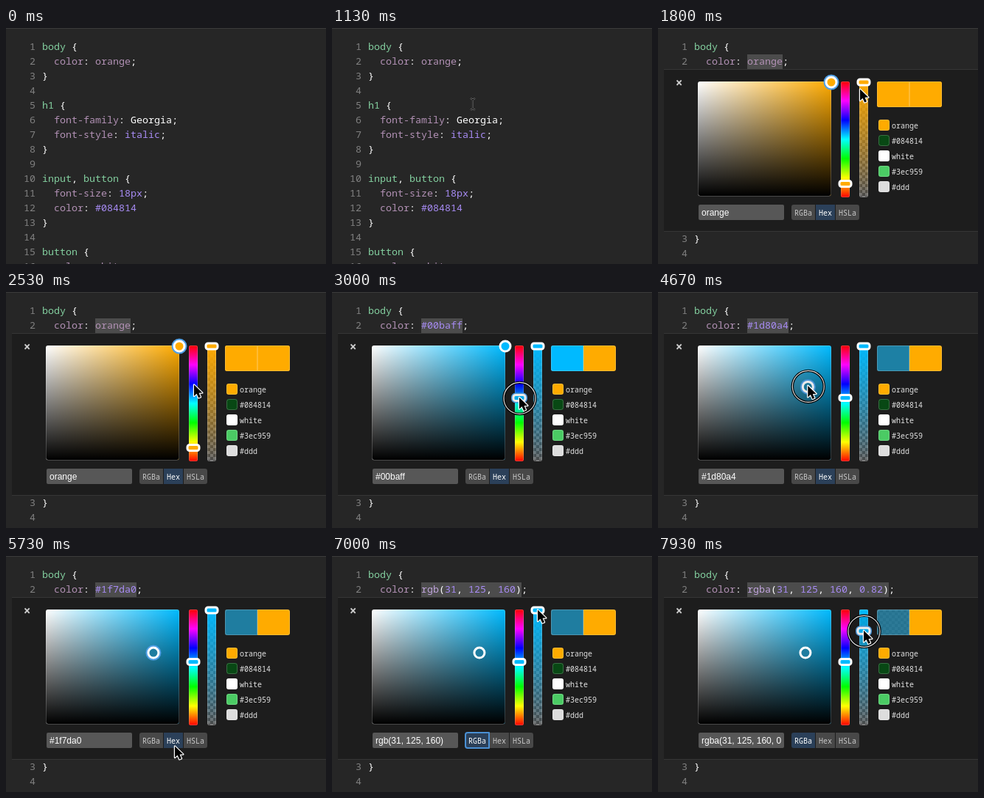
Animation, 434 px wide and 322 px high, one loop 8000 ms. Source, as an HTML page with a canvas:

```html
<!DOCTYPE html>
<html lang="en">
<head>
<meta charset="utf-8">
<title>Inline color picker</title>
<style>
  html, body { margin: 0; width: 100%; height: 100%; overflow: hidden; background: #262626; }
  canvas { display: block; width: 434px; height: 322px; }
</style>
</head>
<body>
<canvas width="434" height="322"></canvas>
<script>
const ctx = document.querySelector('canvas').getContext('2d');
const LOOP = 8000, STEP = 1000 / 15;
const MONO = '"Noto Sans Mono", monospace';
const ORANGE = '#ffab00';
const GREEN = '#83cf9f', MAUVE = '#b291b5', VIOLET = '#a78bf3', LIGHT = '#fff';

// Moments of the interaction
const OPEN = 1500, HUE_DOWN = 2640, HUE_UP = 3030, SQUARE_DOWN = 3400, SQUARE_UP = 4960,
      RGB_DOWN = 6250, RGB_UP = 6450, ALPHA_DOWN = 7150;
const PRESSES = [[1340, 1530], [HUE_DOWN, HUE_UP], [SQUARE_DOWN, SQUARE_UP], [RGB_DOWN, RGB_UP], [ALPHA_DOWN, LOOP]];

// Pointer path: time, x, y
const PATH = [
  [70, 442, 315], [870, 268, 201], [1320, 145, 46], [1530, 145, 46], [1800, 274, 84],
  [2530, 255, 127], [2640, 254, 132], [3000, 254, 144.44], [3060, 254, 144.44],
  [3340, 235, 73], [3400, 235, 73], [3666, 225.1, 106.03], [4300, 210, 123],
  [4900, 199.93, 131.1], [5000, 199.93, 131.1], [5700, 229, 260], [5870, 229, 260],
  [6200, 197, 252], [6520, 197, 252], [6990, 279, 74], [7150, 279, 74], [7930, 279, 102.3]
];

const clamp = (v, lo, hi) => Math.min(hi, Math.max(lo, v));
const ease = p => p * p * (3 - 2 * p);

function pointer(t) {
  const i = PATH.findIndex(key => key[0] > t);
  if (i === 0) return PATH[0].slice(1);
  if (i < 0) return PATH[PATH.length - 1].slice(1);
  const [a, b] = [PATH[i - 1], PATH[i]];
  const p = ease((t - a[0]) / (b[0] - a[0]));
  return [a[1] + (b[1] - a[1]) * p, a[2] + (b[2] - a[2]) * p];
}

function hsvToRgb(h, s, v) {
  return [5, 3, 1].map(n => {
    const k = (n + h / 60) % 6;
    return Math.round(255 * (v - v * s * clamp(Math.min(k, 4 - k), 0, 1)));
  });
}

function pickerState(t) {
  const hue = t < HUE_DOWN ? 40.2 : (230 - pointer(clamp(t, HUE_DOWN, HUE_UP))[1]) / 157 * 360;
  const [x, y] = pointer(clamp(t, SQUARE_DOWN, SQUARE_UP));
  const alpha = (231 - pointer(Math.max(t, ALPHA_DOWN))[1]) / 157;
  const rgb = hsvToRgb(hue, (x - 54) / 181, 1 - (y - 73) / 156);
  const useRgb = t >= RGB_DOWN + 80;
  const hex = '#' + rgb.map(c => c.toString(16).padStart(2, '0')).join('');
  const alphaText = alpha.toFixed(2);
  const clear = alphaText < 1;
  const text = t < HUE_DOWN ? 'orange'
    : !useRgb ? hex
    : `rgb${clear ? 'a' : ''}(${rgb.join(', ')}${clear ? ', ' + alphaText : ''})`;
  const focus = t < HUE_DOWN ? 'square' : t < SQUARE_DOWN ? 'hue'
    : t < RGB_DOWN ? 'square' : t < ALPHA_DOWN ? 'mode' : 'alpha';
  return { hue, x, y, alpha, rgb, text, focus, mode: useRgb ? 'RGBa' : 'Hex' };
}

function rect(x, y, w, h, fill, radius = 0) {
  ctx.beginPath();
  ctx.roundRect(x, y, w, h, radius);
  ctx.fillStyle = fill;
  ctx.fill();
}

function stroke(color, width) {
  ctx.strokeStyle = color;
  ctx.lineWidth = width;
  ctx.stroke();
}

function circle(x, y, r) {
  ctx.beginPath();
  ctx.arc(x, y, r, 0, 2 * Math.PI);
}

function label(str, x, y, color, font, align = 'left') {
  ctx.font = font;
  ctx.textAlign = align;
  ctx.fillStyle = color;
  ctx.fillText(str, x, y);
}

function gradient(x0, y0, x1, y1, ...colors) {
  const g = ctx.createLinearGradient(x0, y0, x1, y1);
  colors.forEach((c, i) => g.addColorStop(i / (colors.length - 1), c));
  return g;
}

function clipped(x, y, w, h, radius, draw) {
  ctx.save();
  ctx.beginPath();
  ctx.roundRect(x, y, w, h, radius);
  ctx.clip();
  draw();
  ctx.restore();
}

// Faint light edge just inside a box
function innerEdge(x, y, w, h, radius) {
  ctx.beginPath();
  ctx.roundRect(x + .5, y + .5, w - 1, h - 1, radius);
  stroke('rgba(255,255,255,.2)', 1);
}

function checker(x, y, w, h, size = 4) {
  rect(x, y, w, h, '#4a4a4a');
  for (let r = 0; r * size < h; r++)
    for (let c = r % 2; c * size < w; c += 2) rect(x + c * size, y + r * size, size, size, '#707070');
}

// Code lines as runs of [text, color]
const rule = selector => [[selector, GREEN], [' {', LIGHT]];
const decl = (name, value, color) => [['  ' + name, MAUVE], [': ', LIGHT], [value, color], [';', LIGHT]];
const END = [['}', LIGHT]];

function valueRuns(text) {
  if (!text.startsWith('rgb')) return [[text, text[0] === '#' ? VIOLET : MAUVE]];
  return text.match(/[a-z]+|[\d.]+|[^a-z\d.]+/g)
    .map(s => [s, /[a-z]/.test(s) ? '#c0a4dc' : /\d/.test(s) ? VIOLET : LIGHT]);
}

const codeLines = text => [
  rule('body'),
  [['  color', MAUVE], [': ', LIGHT], ...valueRuns(text), [';', LIGHT]],
  END, [],
  rule('h1'), decl('font-family', 'Georgia', LIGHT), decl('font-style', 'italic', VIOLET), END, [],
  [['input', GREEN], [', ', LIGHT], ['button', GREEN], [' {', LIGHT]],
  decl('font-size', '18px', VIOLET),
  [['  color', MAUVE], [': ', LIGHT], ['#084814', VIOLET]],
  END, [],
  rule('button'), decl('color', 'white', MAUVE)
];

function drawCode(text, shift) {
  const font = `500 13.33px ${MONO}`;
  codeLines(text).forEach((runs, i) => {
    const y = 30 + i * 20 + (i > 1 ? shift : 0);
    let x = 49;
    label(i + 1, 40, y, '#808080', font, 'right');
    for (const [str, color] of runs) {
      label(str, x, y, color, font);
      x += str.length * 8;
    }
  });
}

function slider(x, y, color, focused) {
  ctx.beginPath();
  ctx.roundRect(x - 8, y - 4, 16, 8, 3);
  if (focused) stroke('#4f9fe6', 6);
  ctx.fillStyle = color;
  ctx.fill();
  stroke('#fff', 3);
}

function drawPanel(s) {
  const solid = `rgb(${s.rgb})`;
  const pure = `hsl(${s.hue} 100% 50%)`;
  const pureClear = `hsl(${s.hue} 100% 50% / 0)`;
  label('×', 28.5, 81, '#ccc', `bold 17px ${MONO}`, 'center');

  clipped(54, 73, 181, 156, 3, () => {
    rect(54, 73, 181, 156, gradient(54, 0, 235, 0, '#fff', pure));
    rect(54, 73, 181, 156, gradient(0, 73, 0, 229, '#0000', '#000'));
  });
  innerEdge(54, 73, 181, 157, 3);
  rect(248, 73, 12, 158, gradient(0, 73, 0, 231, '#f00', '#f0f', '#00f', '#0ff', '#0f0', '#ff0', '#f00'), 2);
  innerEdge(248, 73, 12, 158, 2);
  clipped(273, 73, 12, 158, 2, () => {
    checker(273, 73, 12, 158);
    rect(273, 73, 12, 158, gradient(0, 73, 0, 231, pure, pureClear));
  });
  innerEdge(273, 73, 12, 158, 2);

  circle(s.x, s.y + 1, 7);
  if (s.focus === 'square') stroke('#4f9fe6', 7);
  ctx.fillStyle = solid;
  ctx.fill();
  stroke('#fff', 3);
  slider(254, 230 - s.hue / 360 * 157, pure, s.focus === 'hue');
  slider(279, 231 - s.alpha * 157, pure, s.focus === 'alpha');

  clipped(297, 73, 88, 35, 3, () => {
    checker(297, 73, 44, 35);
    rect(297, 73, 44, 35, `rgba(${s.rgb},${s.alpha})`);
    rect(341, 73, 44, 35, ORANGE);
    if (s.text === 'orange') rect(297, 73, 88, 35, ORANGE);
  });
  innerEdge(297, 73, 44, 35, [3, 0, 0, 3]);
  innerEdge(341, 73, 44, 35, [0, 3, 3, 0]);

  const swatches = { orange: ORANGE, '#084814': '#084814', white: '#fff', '#3ec959': '#4bcb64', '#ddd': '#ddd' };
  Object.entries(swatches).forEach(([name, color], i) => {
    rect(299, 125 + i * 21, 15, 15, color, 3);
    innerEdge(299, 125 + i * 21, 15, 15, 3);
    label(name, 317, 137 + i * 21, '#e2e2e2', `10px ${MONO}`);
  });

  rect(55, 241, 116, 21, '#575757', 2);
  clipped(55, 241, 113, 21, 2, () =>
    label(s.text, 59, 256, '#fff', '12px "Liberation Sans", Arial, sans-serif'));

  const buttons = [['RGBa', 181, 32, [3, 0, 0, 3]], ['Hex', 214, 26, 0], ['HSLa', 241, 32, [0, 3, 3, 0]]];
  for (const [name, x, w, radius] of buttons) {
    const active = name === s.mode;
    rect(x, 241, w, 21, active ? '#2b4059' : '#484848', radius);
    if (active && s.focus === 'mode') stroke('#4a90d4', 2);
    label(name, x + w / 2, 256, active ? '#fff' : '#c9c9c9', `10px ${MONO}`, 'center');
  }
}

function drawPointer(t) {
  const [x, y] = pointer(t);
  if (PRESSES.some(([from, to]) => t >= from && t < to)) {
    circle(x + .5, y + .5, 21.5);
    ctx.fillStyle = 'rgba(0,0,0,.08)';
    ctx.fill();
    stroke('#000', 3.5);
    stroke('#ddd', 1.2);
  }
  ctx.beginPath();
  if (t < OPEN) {
    ctx.moveTo(x - 3, y - 8);
    ctx.lineTo(x, y - 6);
    ctx.lineTo(x + 3, y - 8);
    ctx.moveTo(x, y - 6);
    ctx.lineTo(x, y + 6);
    ctx.moveTo(x - 3, y + 8);
    ctx.lineTo(x, y + 6);
    ctx.lineTo(x + 3, y + 8);
    stroke('#888', 2);
    stroke('#000', 1);
    return;
  }
  const arrow = [[0, 0], [0, 15.5], [3.6, 12.2], [6.2, 18], [9, 16.8], [6.5, 11.2], [11.3, 11]];
  arrow.forEach(([dx, dy]) => ctx.lineTo(x + dx, y - .5 + dy));
  ctx.closePath();
  ctx.lineJoin = 'round';
  stroke('#fff', 2.4);
  ctx.fillStyle = '#000';
  ctx.fill();
}

function draw(t) {
  const s = pickerState(t);
  const open = ease(clamp((t - OPEN) / 230, 0, 1));
  rect(0, 0, 434, 322, '#262626');
  rect(0, 0, 434, 1, '#3a3a3a');
  if (t >= OPEN) rect(121, 36, s.text.length * 8, 20, '#4c4c4c');
  drawCode(s.text, 222 * open);
  if (open > 0) {
    const height = 222 * open;
    clipped(8, 56, 426, height, 0, () => {
      rect(8, 56, 426, height, '#1d1d1d');
      drawPanel(s);
      rect(8, 56, 426, 1, '#363636');
      rect(8, 55 + height, 426, 1, '#363636');
    });
  }
  drawPointer(t);
}

const start = performance.now();
function frame() {
  const t = (performance.now() - start) % LOOP;
  draw(Math.floor((t + 5) / STEP) * STEP % LOOP);
  requestAnimationFrame(frame);
}
frame();
</script>
</body>
</html>
```
